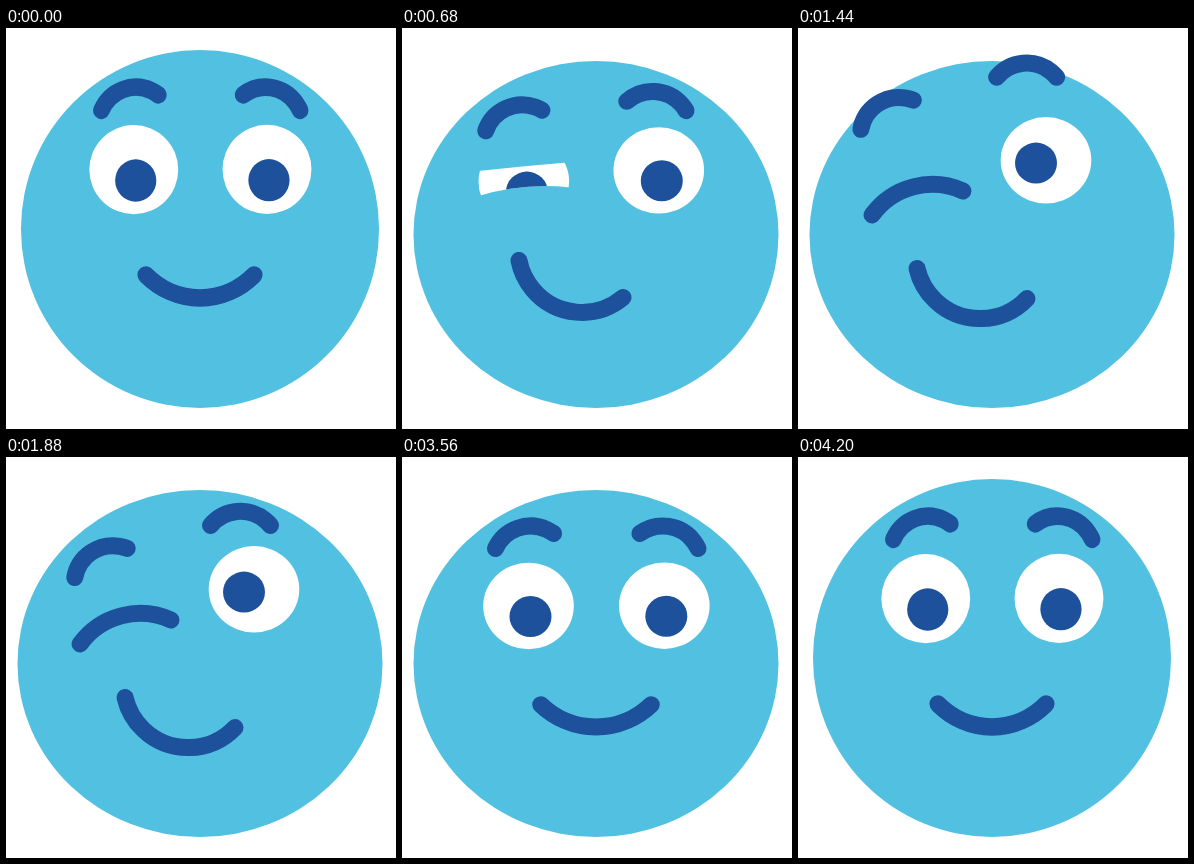
An HTML page with a canvas for the animation above (4760 ms loop, 390 by 401 pixels).

```html
<!DOCTYPE html>
<html lang="en">
<head>
<meta charset="utf-8">
<title>Winking face</title>
<style>
  html, body { margin: 0; width: 100%; height: 100%; overflow: hidden; background: #fff; }
  canvas { display: block; width: 390px; height: 401px; }
</style>
</head>
<body>
<canvas id="stage"></canvas>
<script>
const LOOP = 4760;
const SKY = '#52c0e0', NAVY = '#1d519b', WHITE = '#fff';
const DEGREE = Math.PI / 180;

const canvas = document.getElementById('stage');
const ctx = canvas.getContext('2d');
const ratio = window.devicePixelRatio || 1;
canvas.width = 390 * ratio;
canvas.height = 401 * ratio;

let time = 0;

const mix = (a, b, k) => a + (b - a) * k;

// Eased 0 to 1 between two moments.
function ramp(from, to) {
  const k = Math.min(1, Math.max(0, (time - from) / (to - from)));
  return k * k * (3 - 2 * k);
}

const pulse = (riseFrom, riseTo, fallFrom, fallTo) => ramp(riseFrom, riseTo) - ramp(fallFrom, fallTo);

function ellipse(x, y, rx, ry, color) {
  ctx.beginPath();
  ctx.ellipse(x, y, rx, ry, 0, 0, 2 * Math.PI);
  ctx.fillStyle = color;
  ctx.fill();
}

// A thick round arc over a chord centred on x, y; positive sag bends down.
function bow(x, y, chord, tilt, sag) {
  const side = Math.sign(sag), half = chord / 2;
  const radius = (half * half + sag * sag) / (2 * Math.abs(sag));
  const spread = Math.asin(half / radius);
  const middle = side * Math.PI / 2;
  ctx.save();
  ctx.translate(x, y);
  ctx.rotate(tilt);
  ctx.beginPath();
  ctx.arc(0, sag - side * radius, radius, middle - spread, middle + spread);
  ctx.strokeStyle = NAVY;
  ctx.lineWidth = 17;
  ctx.lineCap = 'round';
  ctx.stroke();
  ctx.restore();
}

function eye(x, y, turn) {
  const glance = turn ** 5;
  ellipse(x, y, 45.3, 43.2, WHITE);
  ellipse(x + 2 + 3 * turn - 15 * glance, y + 10.5 - 7.7 * glance, 21, 20.5, NAVY);
}

function winkingEye(turn) {
  const open = 1 - pulse(480, 760, 2613, 2840);
  const left = 150 + 37 * turn ** 2;
  const right = 145.8 + 17.2 * turn ** 3;
  const middle = (left + right) / 2;
  const sag = 16.7 * turn ** 2;
  if (open === 0) {
    bow(119.5, middle, Math.hypot(91, right - left), Math.atan2(right - left, 91), -sag);
    return;
  }
  const x = mix(126.5, 114.5, turn), gap = 65 * open;
  const fold = middle - 2 * sag, bulge = gap * .65;
  ctx.save();
  ctx.beginPath();
  ctx.moveTo(x - 46, left - gap);
  ctx.quadraticCurveTo(x, fold - bulge, x + 46, right - gap);
  ctx.lineTo(x + 46, right + gap);
  ctx.quadraticCurveTo(x, fold + bulge, x - 46, left + gap);
  ctx.clip();
  eye(x, mix(149, 161, turn), turn);
  ctx.restore();
}

function brows(turn) {
  const raise = pulse(1240, 1400, 1400, 1560) + pulse(1560, 1680, 1680, 1880);
  const dx = -7 * raise, dy = -23 * raise, tilt = 14.5 * DEGREE;
  bow(mix(122.5, 95, turn) + dx, mix(84, 106, turn) + dy, 60, -tilt * (1 + turn), -14.2);
  bow(mix(267, 234.5, turn) + dx, mix(84, 68.5, turn) + dy, 60, tilt * (1 - turn), -14.2);
}

function mouth() {
  const swing = pulse(400, 680, 2440, 2640);
  const settle = pulse(680, 920, 2440, 2640);
  const sway = pulse(2440, 2640, 2640, 2840);
  const lift = pulse(3527, 3680, 4000, 4200);
  bow(
    194 - 25 * swing + 5 * settle + 4 * sway,
    251 + 4.5 * settle - 26 * lift,
    110.5 + 3.5 * settle,
    (19.6 * swing - 4.3 * settle - 4.8 * sway) * DEGREE,
    22.3 + 9.2 * swing + 2.5 * settle - sway
  );
}

function draw() {
  const turn = pulse(505, 920, 2480, 2840);
  const stretch = .0317
    + .027 * ramp(400, 530) - .0587 * ramp(530, 670)
    + .0587 * ramp(3560, 3730) - .027 * ramp(3730, 3930);

  ctx.setTransform(ratio, 0, 0, ratio, 0, 0);
  ctx.fillStyle = WHITE;
  ctx.fillRect(0, 0, 390, 401);
  // The head squashes and stretches from its base.
  ctx.translate(194, 380);
  ctx.scale(1 - .6 * stretch, 1 + stretch);
  ctx.translate(-194, -380);

  ellipse(194, 206.5, 182.5, 173.5, SKY);
  winkingEye(turn);
  eye(mix(262.3, 248, turn), mix(148.7, 132.3, turn), turn);
  brows(turn);
  mouth();
}

const start = performance.now();
function tick() {
  time = (performance.now() - start) % LOOP;
  draw();
  requestAnimationFrame(tick);
}
tick();
</script>
</body>
</html>
```
